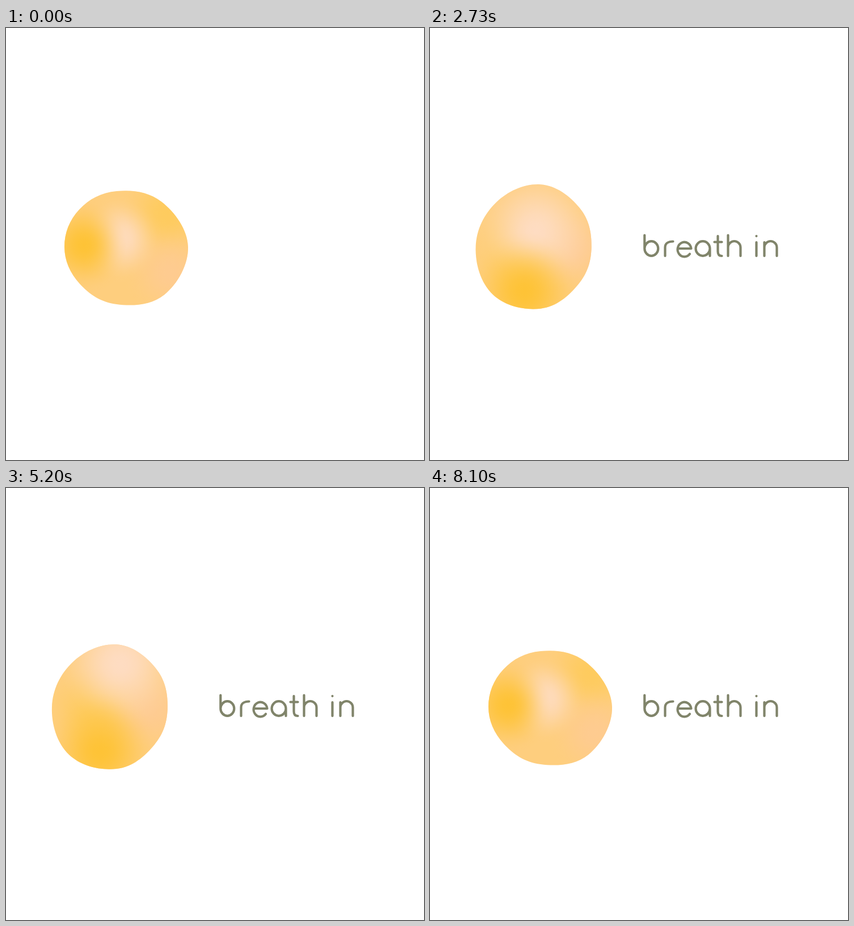
Recreate the animation shown at these times as an HTML page with a canvas. Size 737x760 px, loop 8.13 s.

```html
<!DOCTYPE html>
<html lang="en">
<head>
<meta charset="utf-8">
<title>Breathing blob</title>
<style>
  html, body { margin: 0; width: 100%; height: 100%; overflow: hidden; background: #fff; }
  canvas { position: absolute; left: 0; top: 0; }
  /* Selectable text under the drawn rounded lettering */
  #words { position: absolute; left: 375px; top: 352px; font: 56px/64px Lato, sans-serif; color: transparent; white-space: pre; }
</style>
</head>
<body>
<div id="words"></div>
<canvas id="stage" width="737" height="760"></canvas>
<script>
const LOOP = 8130, BREATH = 7900, TYPE_STEP = 115;
const WIDTH = 737, HEIGHT = 760, CENTER = [195, 385];
const ctx = document.getElementById('stage').getContext('2d');
const words = document.getElementById('words');
const { cos, sin, PI } = Math;

// Radii of eight key points, clockwise from the right, over half a breath
const rest = [126, 119, 101, 92, 92, 93, 98, 112];
const middle = [98, 106, 113, 114, 106, 104, 105, 96];
const full = [87, 82, 100, 119, 121, 116, 114, 103];

// Each spot drifts on a slow wave of the breath phase a
const spots = [
  { color: '#fecb5e', at: a => [200 + 85 * cos(a), 365 - 40 * cos(a)], size: a => 90 },
  { color: '#fecb90', at: a => [270 + 20 * cos(a), 405 + 25 * cos(a)], size: a => 85 },
  { color: '#fedcc2', at: a => [196 + 10 * cos(a + 1.2), 344 + 37 * cos(2 * a + 0.75)], size: a => 105 - 28 * cos(a) },
  { color: '#fec336', at: a => [156 - 18 * cos(a), 437 - 30 * cos(a) - 25 * cos(2 * a)], size: a => 97 - 12 * cos(a) }
];

// Parabola through the three poses
function pose(phase) {
  const p = (1 - cos(phase)) / 2;
  return rest.map((r, i) =>
    r * (1 - p) * (1 - 2 * p) + middle[i] * 4 * p * (1 - p) + full[i] * p * (2 * p - 1));
}

// Smooth closed curve; TENSION makes equal radii a true circle
function outline(radii) {
  const n = radii.length, TENSION = 5.33;
  const point = i => {
    const a = i / n * 2 * PI, r = radii[(i + n) % n];
    return [CENTER[0] + r * cos(a), CENTER[1] + r * sin(a)];
  };
  const path = new Path2D();
  path.moveTo(...point(0));
  for (let i = 0; i < n; i++) {
    const [a, b, c, d] = [-1, 0, 1, 2].map(k => point(i + k));
    path.bezierCurveTo(
      b[0] + (c[0] - a[0]) / TENSION, b[1] + (c[1] - a[1]) / TENSION,
      c[0] - (d[0] - b[0]) / TENSION, c[1] - (d[1] - b[1]) / TENSION, ...c);
  }
  return path;
}

function drawSpot(color, [x, y], size) {
  const glow = ctx.createRadialGradient(x, y, 0, x, y, size);
  for (let i = 0; i <= 8; i++) {
    const alpha = Math.round(255 * (1 + cos(PI * i / 8)) / 2);
    glow.addColorStop(i / 8, color + alpha.toString(16).padStart(2, '0'));
  }
  ctx.fillStyle = glow;
  ctx.fillRect(0, 0, WIDTH, HEIGHT);
}

function drawBlob(t) {
  const phase = 2 * PI * Math.min(t / BREATH, 1);
  ctx.save();
  ctx.clip(outline(pose(phase)));
  ctx.fillStyle = '#fece7e';
  ctx.fillRect(0, 0, WIDTH, HEIGHT);
  for (const { color, at, size } of spots) drawSpot(color, at(phase), size(phase));
  ctx.restore();
}

const bowl = (x, r) => `M${x - r} 388a${r} 12.8 0 1 0 ${2 * r} 0a${r} 12.8 0 1 0 ${-2 * r} 0`;
const stem = (x, top) => `M${x} ${top}V401`;
const arch = x => `M${x} 386a11 11 0 0 1 22 0V401`;
const letters = [
  ['b', stem(378.3, 364.5).replace('401', '388') + bowl(390.3, 12)],
  ['r', 'M414.5 401V386C414.5 379 420 375.5 428.5 375.5'],
  ['e', 'M436.7 388H460.5A12 12.8 0 1 0 458 397.5'],
  ['a', stem(493.5, 388) + bowl(481, 12.5)],
  ['t', 'M507.5 366V393Q507.5 401 514.5 401M501.5 376.5H514.5'],
  ['h', stem(525.5, 364.5) + arch(525.5)],
  [' ', ''],
  ['i', stem(575.5, 377) + 'M575.5 366v.1'],
  ['n', stem(589.5, 377) + arch(589.5)]
].map(([char, d]) => ({ char, path: new Path2D(d) }));

function drawWords(t) {
  const shown = letters.slice(0, Math.floor(t / TYPE_STEP));
  const text = shown.map(l => l.char).join('');
  if (words.textContent !== text) words.textContent = text;
  ctx.strokeStyle = '#80846a';
  ctx.lineWidth = 4.2;
  ctx.lineCap = ctx.lineJoin = 'round';
  for (const { path } of shown) ctx.stroke(path);
}

const start = performance.now();
function frame() {
  const t = (performance.now() - start) % LOOP;
  ctx.clearRect(0, 0, WIDTH, HEIGHT);
  drawBlob(t);
  drawWords(t);
  requestAnimationFrame(frame);
}
frame();
</script>
</body>
</html>
```
